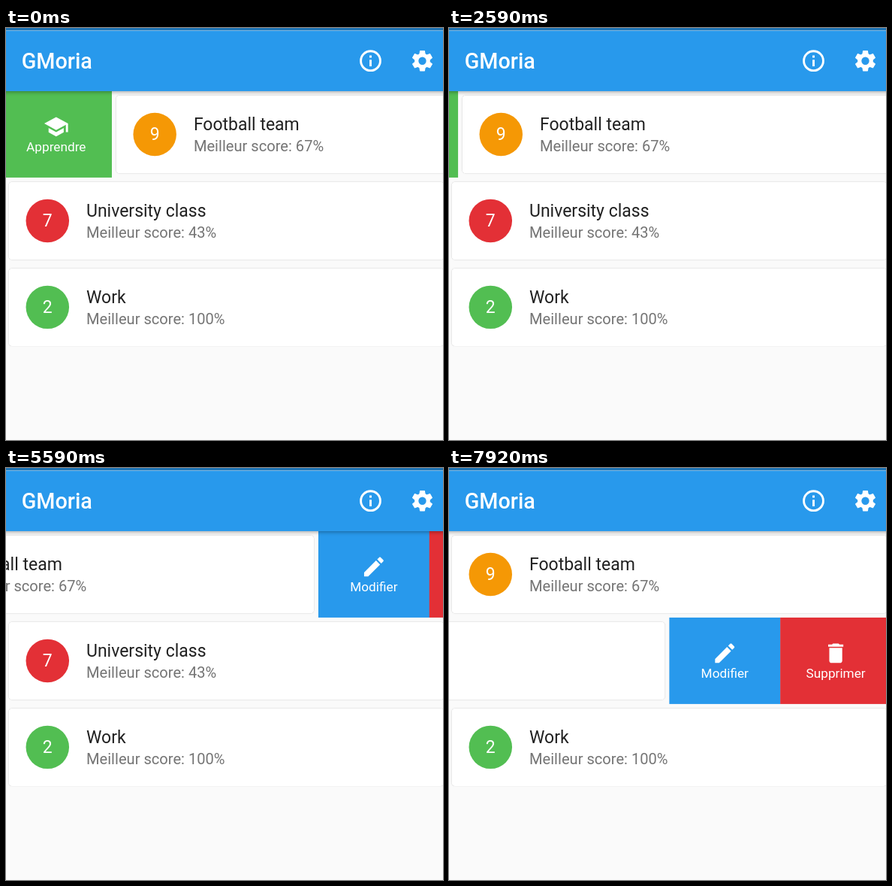
Write an HTML page that moves like this. It is 582 by 548 pixels and loops after 8000 ms.

```html
<!DOCTYPE html>
<html lang="fr">
<head>
<meta charset="utf-8">
<title>Listes</title>
<style>
  html, body { margin: 0; width: 100%; height: 100%; overflow: hidden; background: #fafafa; }
  svg { display: block; font-family: Roboto, sans-serif; }
  .title { font-size: 16px; fill: #212121; }
  .score { font-size: 14px; fill: #757575; }
  .count { font-size: 16px; fill: #fff; text-anchor: middle; }
  .label { font-size: 12px; fill: #fff; text-anchor: middle; }
  .heading { font-size: 20px; font-weight: 500; fill: #fff; }
  .card { fill: #fff; filter: drop-shadow(0 .8px .5px #0004) drop-shadow(0 0 .8px #0001); }
  .bar { fill: #2899ec; filter: drop-shadow(0 1.5px 2px #0005); }
</style>
</head>
<body>
<svg width="582" height="548" viewBox="0 0 582 548">
  <g id="screen" transform="translate(-2.2 3.5) scale(1.437)"></g>
</svg>
<script>
const WIDTH = 411.4, ROW = 80, BAR = 56, ACTION = WIDTH / 4, LOOP = 8000, FPS = 12;
const BLUE = '#2899ec', GREEN = '#52be52', RED = '#e33036', ORANGE = '#f59805', INDIGO = '#3f48b0';

const icons = {
  game: 'M21 6H3c-1.1 0-2 .9-2 2v8c0 1.1.9 2 2 2h18c1.1 0 2-.9 2-2V8c0-1.1-.9-2-2-2zm-10 7H8v3H6v-3H3v-2h3V8h2v3h3v2zm4.5 2a1.5 1.5 0 1 1 0-3 1.5 1.5 0 0 1 0 3zm4-3a1.5 1.5 0 1 1 0-3 1.5 1.5 0 0 1 0 3z',
  school: 'M5 13.18v4L12 21l7-3.82v-4L12 17l-7-3.82zM12 3L1 9l11 6 9-4.91V17h2V9L12 3z',
  pencil: 'M3 17.25V21h3.75L17.81 9.94l-3.75-3.75L3 17.25zM20.71 7.04c.39-.39.39-1.02 0-1.41l-2.34-2.34c-.39-.39-1.02-.39-1.41 0l-1.83 1.83 3.75 3.75 1.83-1.83z',
  trash: 'M6 19c0 1.1.9 2 2 2h8c1.1 0 2-.9 2-2V7H6v12zM19 4h-3.5l-1-1h-5l-1 1H5v2h14V4z',
};

const actions = [
  { x: -2 * ACTION, color: INDIGO, icon: 'game', label: 'Jeu' },
  { x: -ACTION, color: GREEN, icon: 'school', label: 'Apprendre' },
  { x: WIDTH, color: BLUE, icon: 'pencil', label: 'Modifier' },
  { x: WIDTH + ACTION, color: RED, icon: 'trash', label: 'Supprimer' },
];

const lists = [
  { title: 'Football team', count: 9, score: 67, color: ORANGE },
  { title: 'University class', count: 7, score: 43, color: RED },
  { title: 'Work', count: 2, score: 100, color: GREEN },
];

// Each swipe shifts a row by a fraction of its two-action pane.
const swipes = [
  { row: 0, start: -574, end: 600, by: 1 },
  { row: 0, start: 1700, end: 2717, by: -1 },
  { row: 0, start: 3040, end: 3800, by: -1 },
  { row: 0, start: 4950, end: 6380, by: 1 },
  { row: 1, start: 7040, end: 7800, by: -1 },
];

const actionView = ({ x, color, icon, label }) => `
  <g transform="translate(${x})">
    <rect width="${ACTION + .2}" height="${ROW}" fill="${color}"/>
    <path transform="translate(${ACTION / 2 - 12} 21)" fill="#fff" d="${icons[icon]}"/>
    <text class="label" x="${ACTION / 2}" y="56">${label}</text>
  </g>`;

const rowView = ({ title, count, score, color }, i) => `
  <g transform="translate(0 ${BAR + i * ROW})"><g class="row">
    ${actions.map(actionView).join('')}
    <rect class="card" x="4" y="4" width="${WIDTH - 8}" height="${ROW - 8}" rx="3"/>
    <circle cx="40" cy="40" r="20" fill="${color}"/>
    <text class="count" x="40" y="45.5">${count}</text>
    <text class="title" x="76" y="36">${title}</text>
    <text class="score" x="76" y="56">Meilleur score: ${score}%</text>
  </g></g>`;

const tooth = (_, i) => `<path transform="rotate(${i * 60})" d="M-2.5-6L-2-9.2H2L2.5-6z"
  fill="#fff" stroke-width=".8" stroke-linejoin="round"/>`;

const barView = `
  <rect class="bar" x="-10" width="${WIDTH + 20}" height="${BAR}"/>
  <rect y="-3" width="${WIDTH}" height="2.7" fill="#1f75b6"/>
  <text class="heading" x="16" y="35">GMoria</text>
  <g transform="translate(339.4 28)" fill="none" stroke="#fff" stroke-width="2">
    <circle r="9"/><path d="M0-5v2M0-1v6"/>
  </g>
  <g transform="translate(387.4 28)" fill="none" stroke="#fff">
    <circle r="5.4" stroke-width="3.6"/>${Array.from({ length: 6 }, tooth).join('')}
  </g>`;

document.getElementById('screen').innerHTML = lists.map(rowView).join('') + barView;
const rows = document.querySelectorAll('.row');

function ease(t) {
  const s = Math.min(1, Math.max(0, t));
  return s * s * (3 - 2 * s);
}

function draw(now) {
  const step = 1000 / FPS;
  const t = Math.floor((now % LOOP) / step) * step;
  rows.forEach((row, i) => {
    const open = swipes.filter(s => s.row === i)
      .reduce((sum, s) => sum + s.by * ease((t - s.start) / (s.end - s.start)), 0);
    row.setAttribute('transform', `translate(${open * 2 * ACTION})`);
  });
}

function loop() {
  draw(performance.now());
  requestAnimationFrame(loop);
}
loop();
</script>
</body>
</html>
```
